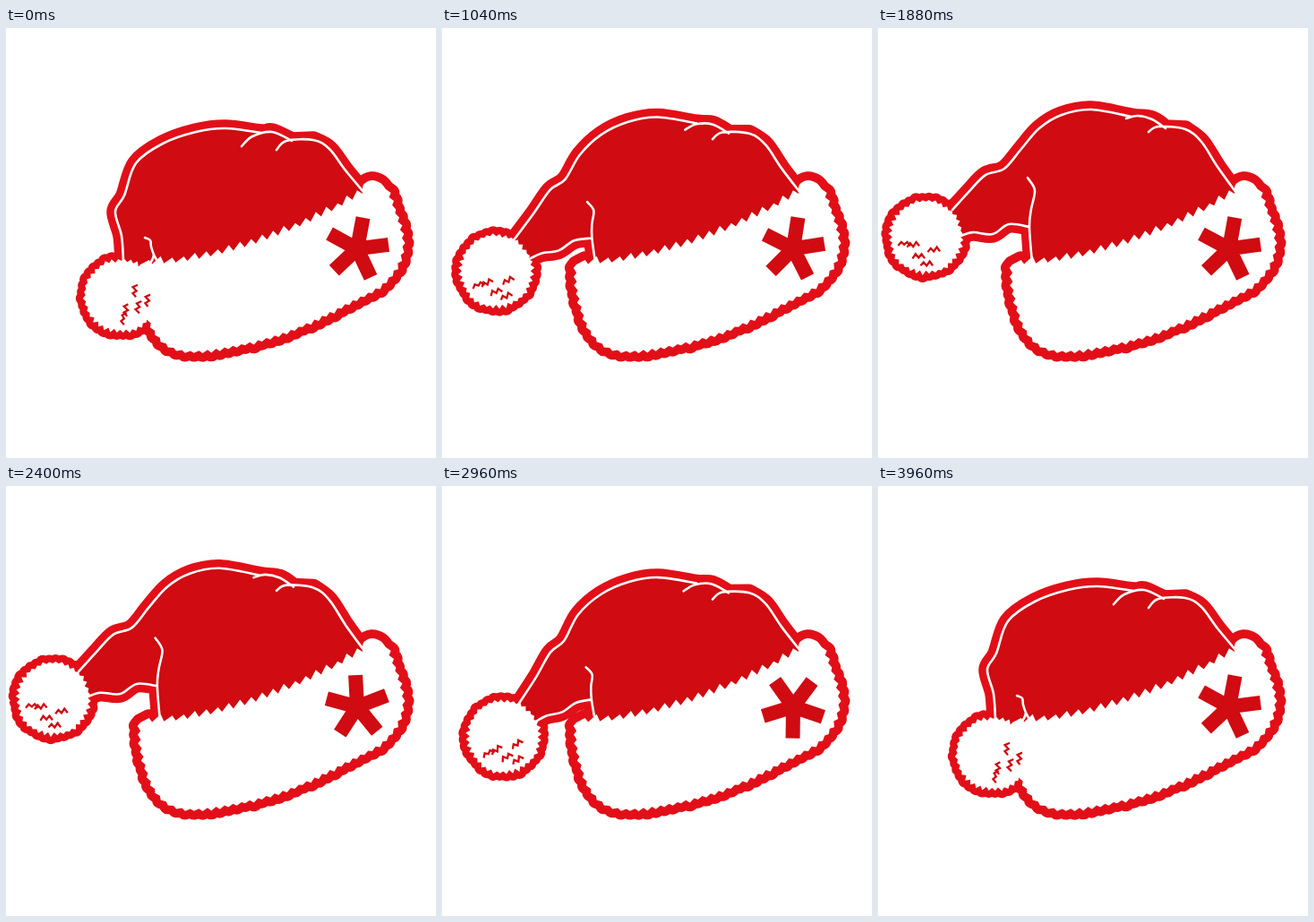
These frames come from a looping animation (480 px wide and 480 px high, 4000 ms). An HTML page:

```html
<!DOCTYPE html>
<html lang="en">
<head>
<meta charset="utf-8">
<title>Santa hat</title>
<style>
  html, body { margin: 0; width: 100%; height: 100%; overflow: hidden; background: #fff; }
  svg { display: block; width: 100vw; height: 100vh; }
  .rim { fill: #e20f18; stroke: #e20f18; stroke-width: 19.5; stroke-linejoin: round; }
  .rim.thin { stroke-width: 16; }
  .cloth { fill: #d00b11; }
  .fur { fill: #fff; }
  .seam { fill: none; stroke: #fff; stroke-width: 2.6; stroke-linecap: round; stroke-linejoin: round; }
  .curl { fill: none; stroke: #d00b11; stroke-width: 2.3; }
</style>
</head>
<body>
<svg viewBox="0 0 480 480" xmlns="http://www.w3.org/2000/svg">
  <path id="bodyRim" class="rim"/>
  <path id="brimRim" class="rim"/>
  <path id="pomRim" class="rim thin"/>
  <path id="body" class="cloth"/>
  <path id="seams" class="seam"/>
  <path id="brim" class="fur"/>
  <g id="pomBox">
    <path id="pom" class="fur"/>
    <path id="curls" class="curl"/>
  </g>
  <path id="star" class="cloth"/>
</svg>
<script>
const $ = id => document.getElementById(id);
const set = (id, d) => $(id).setAttribute("d", d);
const LOOP = 4000, SWING = 1950, OUT = 20, BACK = 1973;

let seed = 7;
const rand = () => (seed = seed * 16807 % 2147483647) / 2147483647;

const range = (n, f) => Array.from({ length: n }, (_, i) => f(i));
const points = s => s.split(" ").map(p => p.split(",").map(Number));
const fmt = p => p.map(v => v.toFixed(2)).join(" ");
const line = pts => pts.map(fmt).join("L");

// Smooth curve through points, without the leading move
function curve(pts) {
  let d = fmt(pts[0]);
  for (let i = 0; i < pts.length - 1; i++) {
    const a = pts[i], b = pts[i + 1], p = pts[i - 1] || a, n = pts[i + 2] || b;
    const c1 = a.map((v, k) => v + (b[k] - p[k]) / 6);
    const c2 = b.map((v, k) => v - (n[k] - a[k]) / 6);
    d += "C" + [c1, c2, b].map(fmt).join(" ");
  }
  return d;
}

// Sawtooth fur on the left side of a path
function fuzz(d, step, height, lean) {
  const path = document.createElementNS("http://www.w3.org/2000/svg", "path");
  path.setAttribute("d", d);
  const len = path.getTotalLength(), n = Math.round(len / step);
  return line(range(n, i => {
    const a = path.getPointAtLength(len * i / n), b = path.getPointAtLength(len * (i + 1) / n);
    const dx = b.x - a.x, dy = b.y - a.y, h = height * (0.7 + 0.6 * rand()) / Math.hypot(dx, dy);
    return [[a.x, a.y], [a.x + dx * lean + dy * h, a.y + dy * lean - dx * h]];
  }).flat());
}

// Lines of the hanging hat and of the raised hat
const part = (down, up) => ({ down: points(down), up: points(up) });
const crown = part(
  "131,260 129,232 122,205 132,187 145,151 175,129 212,116 245,112 285,117",
  "83,203 103,181 120,164 141,157 160,135 180,112 205,97 238,91 283,99");
const under = part(
  "158,270 160,265 162,261 164,257 165,253",
  "92,232 106,228 128,230 146,219 169,222");
const crease = part(
  "155,234 161,237 162,244 165,253 170,262",
  "167,167 175,181 171,202 169,222 172,262");
const foldA = part("263,132 275,121 297,116 319,126", "277,101 290,98 306,102 321,112");
const foldB = part("302,136 313,126 343,125 361,135 379,159 400,184", "");
foldB.up = foldB.down.map(([x, y], i) => [x, y - 20 + 4 * i]);

// The free end swings out on an arc; `hang` tells how much a point shares in it
function pose({ down, up }, e, hang = () => 0) {
  const arc = 4 * e * (1 - e);
  return down.map(([x, y], i) => [
    x + (up[i][0] - x) * e - 24 * arc * hang(i),
    y + (up[i][1] - y) * e + 12 * arc * hang(i)
  ]);
}

function brimShape() {
  const cap = points("398,185 399,175 408,170 418,173 424,180");
  const low = points("424,180 437,215 442,248 424,282 385,305 310,340 235,358 190,358 165,336 152,295 150,264");
  return "M" + fuzz("M150 264L172 263C240 260 330 227 398 185", 13, 6.5, 0.75) +
    "L" + curve(cap) + "L" + fuzz("M" + curve(low), 9.5, 3, 0.6) + "Z";
}

const pomShape = () => "M" + line(range(72, i => {
  const a = i * Math.PI / 36, r = (i % 2 ? 41 : 37.5) + 2 * rand();
  return [r * Math.cos(a), r * Math.sin(a)];
})) + "Z";

const curlShape = () => points("-31,6 -21,7 2,13 -15,20 -6,29")
  .map(([x, y]) => "M" + line(range(5, i => [x + 3.4 * i, y + (i % 2 ? -2 : 2.5) + 2 * rand()])))
  .join("");

function starShape(deg) {
  return range(5, i => {
    const a = (deg + i * 72) * Math.PI / 180, c = Math.cos(a), s = Math.sin(a);
    const arm = [[-8, 0], [-8, -35.3], [8, -35.3], [8, 0]];
    return "M" + line(arm.map(([x, y]) => [392 + x * c - y * s, 246.4 + x * s + y * c])) + "Z";
  }).join("");
}

// Symmetric bezier ease with handles at 0.76 and 0.24
function ease(x) {
  if (x <= 0) return 0;
  if (x >= 1) return 1;
  let lo = 0, hi = 1;
  for (let i = 0; i < 30; i++) {
    const p = (lo + hi) / 2, q = 1 - p;
    if (2.28 * p * q * q + 0.72 * p * p * q + p * p * p < x) lo = p; else hi = p;
  }
  return lo * lo * (3 - 2 * lo);
}

const brim = brimShape(), pom = pomShape();
set("brim", brim);
set("brimRim", brim);
set("pom", pom);
set("pomRim", pom);
set("curls", curlShape());

const bobble = part("128,299", "53.5,233");

function draw(t) {
  const e = t < BACK ? ease((t - OUT) / SWING) : 1 - ease((t - BACK) / SWING);
  const top = pose(crown, e, i => Math.max(0, 1 - i / 2));
  const low = pose(under, e, i => 1 - i / 4);
  const [a, b, fold] = [foldA, foldB, crease].map(p => pose(p, e));
  const [mid] = pose(bobble, e, () => 1);

  set("seams", [top, a, b, low, fold].map(c => "M" + curve(c)).join(""));
  const body = "M" + curve([...top, ...a.slice(2)]) + "L" + curve(b.slice(2)) + "L300 255L" +
    curve(fold.slice(3).reverse()) + "L" + curve(low.reverse()) + "L" + fmt(mid) + "Z";
  set("body", body);
  set("bodyRim", body);

  const turn = -79 * (1 - e) + 50 * e * (1 - e);
  for (const id of ["pomBox", "pomRim"])
    $(id).setAttribute("transform", `translate(${mid}) rotate(${turn})`);
  set("star", starShape(10.7 + 360 * e));
}

const start = performance.now();
function tick() {
  draw((performance.now() - start) % LOOP);
  requestAnimationFrame(tick);
}
tick();
</script>
</body>
</html>
```
